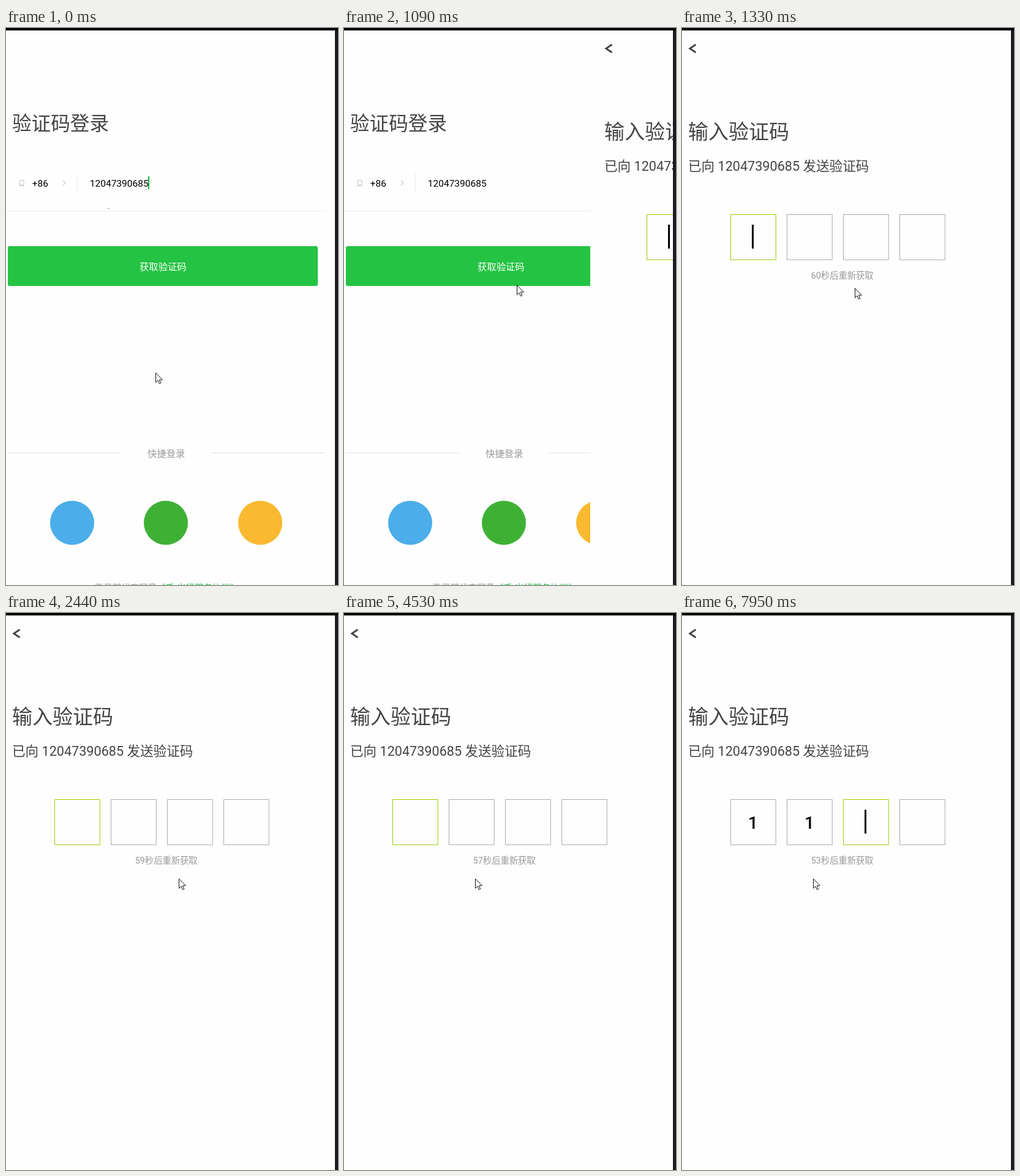
An HTML page that plays this animation: 542 px wide and 909 px high, repeating every 8000 ms.

```html
<!DOCTYPE html>
<html lang="zh-CN">
<head>
<meta charset="utf-8">
<title>验证码登录</title>
<style>
  html, body { margin: 0; width: 100%; height: 100%; overflow: hidden; background: #fefefe; }
  svg { display: block; width: 542px; height: 909px; }
  text { font-family: Roboto, "Noto Sans CJK SC", "Noto Sans CJK", sans-serif; white-space: pre; }
  .mid { text-anchor: middle; }
  .hair { shape-rendering: crispEdges; }
</style>
</head>
<body>
<svg viewBox="0 0 542 909">
  <defs><clipPath id="screen"><rect y="4" width="537" height="905"/></clipPath></defs>
  <rect width="542" height="909" fill="#fefefe"/>
  <g clip-path="url(#screen)">
    <g id="login">
      <text x="10" y="166.5" font-size="31.6" fill="#444">验证码登录</text>
      <path d="M22.5 248.5h6.5v9h-6.5zM22.5 256h6.5" fill="none" stroke="#c4c4c4"/>
      <text x="42.7" y="258.7" font-size="15.5">+86</text>
      <path d="M93 249l4 4l-4 4" fill="none" stroke="#ccc" stroke-width="1.2"/>
      <text x="136.8" y="258.7" font-size="15.5" class="phone"></text>
      <rect id="bar" x="232" y="242" width="2" height="21" fill="#1fb53c"/>
      <rect id="dot" x="167" y="294" width="1" height="1"/>
      <g class="hair" fill="#ececec">
        <rect x="116" y="237" width="1" height="32"/>
        <rect y="298" width="522" height="1"/>
        <rect x="3" y="693" width="185" height="1" fill="#e4e4e4"/>
        <rect x="335" y="693" width="186" height="1" fill="#e4e4e4"/>
      </g>
      <rect x="3" y="356" width="506" height="65" rx="3" fill="#24c343"/>
      <text x="256.3" y="394.7" font-size="15.3" fill="#fff" class="mid">获取验证码</text>
      <text x="261.7" y="699.6" font-size="15.3" fill="#999" class="mid">快捷登录</text>
      <circle cx="108" cy="807.5" r="36" fill="#4bade9"/>
      <circle cx="261" cy="807.5" r="36" fill="#3eb135"/>
      <circle cx="415" cy="807.5" r="36" fill="#fab930"/>
      <text x="144.5" y="919" font-size="14.5" fill="#999">登录即代表同意<tspan fill="#24c343">《禾-出行服务协议》</tspan></text>
    </g>
    <g id="verify">
      <rect x="-13" y="4" width="560" height="905" fill="#fefefe"/>
      <path d="M22.5 27L12.8 33.5L22.5 40" fill="none" stroke="#444" stroke-width="2.8"/>
      <text x="10" y="181.3" font-size="33" fill="#444">输入验证码</text>
      <text x="10" y="232.7" font-size="21.6" fill="#444">已向 <tspan class="phone"></tspan> 发送验证码</text>
      <g id="cells"></g>
      <rect id="caret" y="321" width="3" height="39"/>
      <text id="count" x="210.8" y="408.8" font-size="14.3" fill="#999"></text>
    </g>
  </g>
  <rect x="537" width="5" height="909" fill="#1b1a21"/>
  <rect width="542" height="4"/>
  <path id="mouse" d="M.5 .8V16.3L4 12.9L6.4 18.5L8.8 17.5L6.4 12H11.4Z" fill="#fff" stroke="#111"/>
</svg>
<script>
const LOOP = 8000, PITCH = 92, PHONE = "12047390685";
const $ = id => document.getElementById(id);

// The screen refreshes only at these moments.
const ticks = [0, 120, 250, 380, 510, 940, 1090, 1210, 1330, 1480, 1640, 1910, 2440, 2840, 2990,
  3390, 3950, 4230, 4380, 4530, 4850, 4990, 5390, 5790, 5950, 6390, 6790, 6940, 7380, 7810, 7950];
const blinks = [1480, 1910, 2440, 2840, 3390, 3950, 4380, 4850, 5390, 5790, 6790, 7380];
const typed = [6390, 7810];
const path = [[0, 244, 562], [120, 248, 545], [380, 274, 440], [510, 279, 406], [940, 281, 411],
  [1090, 282, 419], [1330, 282, 424], [1640, 282, 433], [3390, 282, 433], [3950, 280, 433],
  [4230, 262, 433], [4530, 214, 433]];

const passed = (list, t) => list.filter(x => x <= t).length;
const show = (el, on) => el.setAttribute("visibility", on ? "inherit" : "hidden");
const move = (el, x, y) => el.setAttribute("transform", `translate(${Math.round(x)} ${Math.round(y)})`);

function make(tag, attrs) {
  const el = document.createElementNS("http://www.w3.org/2000/svg", tag);
  for (const k in attrs) el.setAttribute(k, attrs[k]);
  return $("cells").appendChild(el);
}

const cells = [0, 1, 2, 3].map(i => ({
  box: make("rect", { x: 79.5 + PITCH * i, y: 304.5, width: 73.7, height: 73.7, fill: "none" }),
  digit: make("text", { x: 116 + PITCH * i, y: 352, "font-size": 28, "font-weight": 500, class: "mid" })
}));
document.querySelectorAll(".phone").forEach(el => el.textContent = PHONE);

function mouseAt(t) {
  const i = path.findIndex(p => p[0] > t);
  if (i < 0) return path[path.length - 1].slice(1);
  const [t0, x0, y0] = path[i - 1], [t1, x1, y1] = path[i];
  const k = (t - t0) / (t1 - t0);
  return [x0 + (x1 - x0) * k, y0 + (y1 - y0) * k];
}

function slideAt(t) {
  const u = Math.min(1, Math.max(0, (t - 1000) / 273));
  return 550 * (1 + Math.cos(Math.PI * u)) / 2;
}

function draw(time) {
  const t = ticks[passed(ticks, time) - 1];
  const active = passed(typed, t);

  show($("bar"), t < 380 || t === 940);
  show($("dot"), t < 1090);
  show($("verify"), t > 1000);
  move($("verify"), slideAt(t), 0);

  cells.forEach((c, i) => {
    c.box.setAttribute("stroke", i === active ? "#99cc00" : "#aaa");
    c.digit.textContent = i < active ? "1" : "";
  });
  $("caret").setAttribute("x", 114 + PITCH * active);
  show($("caret"), passed(blinks, t) % 2 === 0);
  $("count").textContent = 60 - Math.max(0, Math.floor((t - 910) / 1000)) + "秒后重新获取";
  move($("mouse"), ...mouseAt(t));
}

const start = performance.now();
function frame() {
  draw((performance.now() - start) % LOOP);
  requestAnimationFrame(frame);
}
frame();
</script>
</body>
</html>
```
